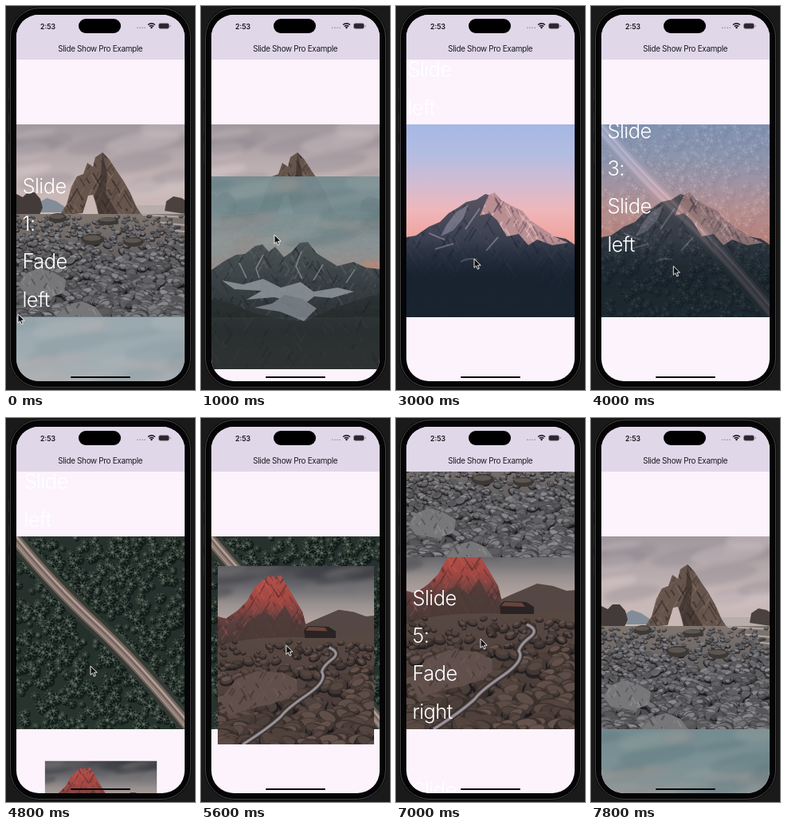
An HTML page with a canvas that plays this animation: 237 px wide and 480 px high, repeating every 8000 ms.

```html
<!DOCTYPE html>
<html lang="en">
<head>
<meta charset="utf-8">
<title>Slide show</title>
<style>
html, body { margin: 0; width: 100%; height: 100%; overflow: hidden; background: #1a1a1b; }
body { position: relative; font-family: Inter, Roboto, sans-serif; }
body *, canvas { position: absolute; box-sizing: border-box; }
.button { left: 3px; width: 4px; background: #29292b; border-radius: 2px; }
.phone { left: 5px; top: 2px; width: 227px; height: 475px; border-radius: 37px; background: #050506;
  border: 1.5px solid #454547; box-shadow: 0 0 0 1px #0b0b0c; }
.screen { left: 12.5px; top: 10.5px; width: 211.5px; height: 458.5px; border-radius: 28px; overflow: hidden; background: #fcf3fd; }
.bar { left: 0; top: 0; width: 100%; height: 56.5px; background: #e0d7e9; }
.view { left: 0; top: 56.5px; width: 100%; height: 402px; overflow: hidden; }
.time { left: 30.5px; top: 9px; font: 600 8.7px/12px Inter, sans-serif; color: #151318; white-space: pre; }
.title { left: 0; width: 100%; top: 35.5px; text-align: center; font: 400 9.9px/14px Inter, sans-serif;
  letter-spacing: -.3px; color: #1d1a20; white-space: pre; }
.island { left: 78px; top: 5.5px; width: 53px; height: 18px; border-radius: 9px; background: #000; }
.home { left: 68.5px; top: 452px; width: 75px; height: 2.6px; border-radius: 2px; background: #08080a; }
.slide { left: 0; top: 81px; width: 212px; height: 241px; }
.caption { left: 8px; top: 133.5px; font: 300 25.5px/47.4px Inter, Roboto, sans-serif; letter-spacing: -.6px;
  color: #fff; white-space: pre; }
svg { left: 0; top: 0; overflow: visible; }
</style>
</head>
<body>
<div class="button" style="top:102px;height:16px"></div>
<div class="button" style="top:133px;height:27px"></div>
<div class="button" style="top:170px;height:27px"></div>
<div class="phone"></div>
<div class="screen">
  <div class="view" id="view"></div>
  <div class="bar"></div>
  <div class="time">2:53</div>
  <div class="title">Slide Show Pro Example</div>
  <div class="island"></div>
  <svg width="212" height="40">
    <path d="M151 16.3h11" stroke="#a59daa" stroke-width="1.5" stroke-dasharray="1.6 1.5"/>
    <path d="M165 12.5q4.5-3.6 9 0M166.7 14.5q2.8-2.2 5.6 0" fill="none" stroke="#151318" stroke-width="1.5"/>
    <path d="M167.8 15.7q1.7-1.3 3.4 0l-1.7 1.8z" fill="#151318"/>
    <rect x="178.5" y="10.7" width="13" height="6.6" rx="2" fill="#29262d" stroke="#8b8591" stroke-width=".7"/>
    <path d="M193.2 13v2" stroke="#8b8591"/>
  </svg>
  <div class="home"></div>
</div>
<svg id="cursor" width="12" height="16"><path d="M0 0V11.2L2.6 8.8 4.4 13 6.3 12.1 4.6 8.1H8.2Z" fill="#111" stroke="#fff" stroke-width=".9"/></svg>
<script>
const W = 212, H = 241, LOOP = 8000, STEP = 200;
const view = document.getElementById('view');
const cursor = document.getElementById('cursor');

function random(seed) {
  return () => (seed = (seed * 16807) % 2147483647) / 2147483647;
}

function gradient(g, y0, y1, ...colors) {
  const fill = g.createLinearGradient(0, y0, 0, y1);
  colors.forEach((c, i) => fill.addColorStop(i / (colors.length - 1), c));
  return fill;
}

// Points are written as an "x,y x,y" string.
function shape(g, fill, points) {
  g.fillStyle = fill;
  g.fill(new Path2D('M' + points + 'Z'));
}

function line(g, color, width, path) {
  g.strokeStyle = color;
  g.lineWidth = width;
  g.stroke(new Path2D(path));
}

function oval(g, fill, x, y, rx, ry, turn = 0) {
  g.fillStyle = fill;
  g.beginPath();
  g.ellipse(x, y, rx, ry, turn, 0, 7);
  g.fill();
}

function sky(g, bottom, ...colors) {
  g.fillStyle = gradient(g, 0, bottom, ...colors);
  g.fillRect(0, 0, W, H);
}

function clouds(g, rnd, count, bottom, tones) {
  g.filter = 'blur(6px)';
  for (let i = 0; i < count; i++)
    oval(g, tones[i % tones.length], rnd() * W, rnd() * bottom, 20 + rnd() * 38, 4 + rnd() * 9, -.15);
  g.filter = 'none';
}

// Stones grow towards the viewer; each has a shadow and a lit top.
function stones(g, rnd, count, top, size, tone) {
  for (let i = 0; i < count; i++) {
    const depth = i / count, y = top + depth * (H - top + 4), x = rnd() * W;
    const r = size * (.25 + .75 * depth) * (.5 + rnd() * .8), turn = rnd() - .5;
    oval(g, 'rgba(25,24,27,.75)', x, y + r * .25, r * 1.12, r * .74, turn);
    oval(g, tone(rnd(), .75), x, y, r, r * .62, turn);
    oval(g, tone(rnd(), 1), x - r * .1, y - r * .18, r * .7, r * .34, turn);
  }
}

// Short slanted strokes inside a shape give it a rocky grain.
function grain(g, rnd, points, count, colors, length = 12) {
  g.save();
  g.clip(new Path2D('M' + points + 'Z'));
  for (let i = 0; i < count; i++) {
    const x = rnd() * W, y = rnd() * H, d = rnd() * length, side = rnd() < .5 ? -1 : 1;
    line(g, colors[i % colors.length], .6 + rnd() * 2, `M${x} ${y}l${d * .6 * side} ${d}`);
  }
  g.restore();
}

function beach(g) {
  const rnd = random(41);
  sky(g, 112, '#a1989d', '#b4a8ab', '#c8b8b8', '#cabab6');
  clouds(g, rnd, 16, 80, ['rgba(137,130,139,.32)', 'rgba(214,201,203,.35)']);
  shape(g, '#828d99', '28,98 38,92 50,96 62,104 62,110 28,110');
  g.fillStyle = '#b7adab';
  g.fillRect(140, 101, W, 16);
  const left = '0,87 8,91 14,85 23,85 30,93 33,104 29,113 0,112';
  const right = '186,108 188,96 197,90 207,92 212,95 212,112';
  const arch = '54,114 63,100 69,78 76,65 84,62 89,48 96,53 99,41 108,35 116,43 125,57 134,70 143,86 151,104 159,116 104,117 101,102 96,88 90,89 83,111';
  shape(g, '#423b3a', left);
  shape(g, '#4b4240', right);
  shape(g, '#66554c', arch);
  grain(g, rnd, arch, 900, ['rgba(45,37,35,.55)', 'rgba(138,116,101,.45)', 'rgba(82,66,57,.6)'], 18);
  shape(g, 'rgba(42,34,33,.5)', '108,36 114,62 112,86 129,115 104,117 97,90 105,74');
  g.fillStyle = gradient(g, 110, H, '#81766f', '#605d5f', '#45474b');
  g.fillRect(0, 112, W, H);
  line(g, '#b0a6a5', 2, 'M158 113l54 3M176 122l36 4M190 132l22 2');
  stones(g, rnd, 1050, 114, 9, (v, k) => `rgb(${(78 + v * 63) * k},${(77 + v * 63) * k},${(80 + v * 65) * k})`);
  [[96, 144, 14, 7], [147, 147, 13, 6], [52, 117, 11, 6], [115, 121, 13, 5]].forEach(([x, y, rx, ry]) => {
    oval(g, '#3c3836', x, y, rx, ry);
    oval(g, '#5e5650', x - 1, y - 2, rx * .8, ry * .5);
  });
  const slabs = ['3,201 10,187 27,180 45,184 62,194 60,210 40,217 12,213', '51,239 64,225 82,221 99,228 109,241 51,241'];
  slabs.forEach(slab => {
    shape(g, '#777779', slab);
    grain(g, rnd, slab, 700, ['rgba(54,55,58,.5)', 'rgba(151,151,153,.5)'], 10);
  });
}

function glacier(g) {
  const rnd = random(77);
  sky(g, 120, '#748b90', '#7b9195', '#8a9698', '#9c918d');
  clouds(g, rnd, 22, 90, ['rgba(91,117,123,.35)', 'rgba(154,164,163,.32)', 'rgba(158,142,139,.25)']);
  g.filter = 'blur(5px)';
  oval(g, '#b48e7e', 205, 115, 20, 10);
  g.filter = 'none';
  const ridge = '0,117 16,106 31,98 42,97 55,87 64,85 72,94 80,88 91,101 101,94 111,83 121,82 132,96 143,103 158,112 178,107 194,114 212,116 212,241 0,241';
  shape(g, gradient(g, 82, 200, '#4c5457', '#353d41', '#242b2d'), ridge);
  grain(g, rnd, ridge, 800, ['rgba(28,36,40,.5)', 'rgba(112,121,125,.3)', 'rgba(61,69,73,.5)'], 16);
  shape(g, '#858d91', '13,130 40,135 65,128 87,139 112,132 128,144 158,139 179,144 151,152 129,150 115,161 79,151 44,154 63,143 29,141');
  shape(g, '#737c81', '92,148 114,153 132,165 116,181 86,169 54,164 76,159');
  line(g, 'rgba(160,165,167,.65)', 1.5, 'M65 98l-9 17l4 12M113 94l-7 18l8 16M35 108l9 19M140 110l-12 20M180 116l-11 17');
  shape(g, gradient(g, 145, H, '#2c3233', '#1f2526', '#242728'), '0,153 25,159 54,171 91,179 118,181 149,166 182,155 212,146 212,241 0,241');
  grain(g, rnd, '0,160 55,177 118,186 212,151 212,241 0,241', 260, ['rgba(17,22,23,.35)', 'rgba(59,63,63,.25)'], 18);
}

function sunset(g) {
  const rnd = random(123);
  sky(g, 143, '#a6b8e4', '#b3bde2', '#d0bcd4', '#efb7bb', '#f0a39e');
  const peak = '0,141 12,139 28,128 42,122 53,111 65,104 75,97 88,94 99,87 106,89 110,85 119,95 132,102 145,108 155,120 170,130 185,140 200,143 212,151 212,241 0,241';
  shape(g, gradient(g, 85, H, '#5b5663', '#3e4353', '#202b39', '#172230'), peak);
  grain(g, rnd, peak, 600, ['rgba(25,34,48,.35)', 'rgba(88,86,101,.24)'], 17);
  const lit = '103,89 110,85 119,95 132,102 145,108 155,120 170,130 185,140 203,148 183,151 164,144 153,151 141,137 126,140 114,120 104,111 92,114 99,98';
  shape(g, '#b98f93', lit);
  grain(g, rnd, lit, 700, ['rgba(82,67,83,.45)', 'rgba(241,204,201,.55)'], 14);
  shape(g, 'rgba(151,150,170,.55)', '62,110 78,100 71,118 58,133 43,140 50,126');
  line(g, 'rgba(154,151,170,.6)', 2, 'M28 136l20 8M36 156l23 -7M92 105l-18 26M68 172q9-6 21-3M115 141l-15 17');
  g.fillStyle = gradient(g, 145, H, 'rgba(23,33,47,0)', 'rgba(23,33,46,.8)', '#1a2531');
  g.fillRect(0, 145, W, 96);
}

function forest(g) {
  const rnd = random(205);
  sky(g, H, '#28332f', '#25302c', '#28352e');
  for (let i = 0; i < 720; i++) {
    const x = rnd() * W, y = i / 720 * (H + 8), r = 3 + rnd() * 4, v = rnd() * 24;
    oval(g, 'rgba(15,24,22,.75)', x + 2, y + 2, r, r);
    for (let k = 0; k < 7; k++) {
      const a = k * .9 + v;
      line(g, `rgba(${60 + v},${73 + v},${64 + v},.8)`, 1.2, `M${x} ${y}l${Math.cos(a) * r} ${Math.sin(a) * r}`);
    }
    oval(g, `rgba(${88 + v},${100 + v},${89 + v},.65)`, x, y, r * .28, r * .28);
  }
  const road = 'M-4 0Q45 60 98 109T218 240';
  line(g, '#343b34', 23, road);
  line(g, '#6f625c', 14, road);
  line(g, '#948078', 9, road);
  line(g, '#bba6a0', 1.6, 'M-2 -2Q47 58 100 107T220 238');
  line(g, '#665d55', 1.5, road);
  line(g, '#ac9890', 1.2, 'M-7 3Q42 63 95 112T215 243');
}

function redPeak(g) {
  const rnd = random(319);
  sky(g, 76, '#45464b', '#65656a', '#98908f', '#b7a8a4');
  clouds(g, rnd, 14, 38, ['rgba(59,61,67,.4)', 'rgba(135,130,131,.25)']);
  shape(g, '#554743', '100,91 116,80 131,73 150,65 164,59 184,62 201,68 212,67 212,120 100,120');
  const peak = '0,68 11,71 27,60 40,47 50,29 62,18 70,13 78,15 86,13 94,27 102,40 109,52 115,62 120,81 132,100 0,112';
  shape(g, gradient(g, 12, 106, '#b2514b', '#a74843', '#5d4140', '#453a38'), peak);
  grain(g, rnd, peak, 1000, ['rgba(79,42,43,.5)', 'rgba(195,93,80,.34)', 'rgba(75,48,46,.45)'], 18);
  shape(g, 'rgba(75,59,56,.8)', '24,91 49,70 64,61 78,73 91,53 103,75 121,83 132,103 10,108');
  g.fillStyle = gradient(g, 90, H, '#594943', '#51423e', '#302927');
  g.beginPath();
  g.moveTo(0, 110);
  g.bezierCurveTo(50, 88, 130, 101, W, 94);
  g.lineTo(W, H);
  g.lineTo(0, H);
  g.fill();
  stones(g, rnd, 330, 102, 17, (v, k) => `rgba(${(73 + v * 39) * k},${(60 + v * 31) * k},${(55 + v * 29) * k},.85)`);
  shape(g, '#292323', '117,87 122,81 150,82 160,88 160,97 118,97');
  shape(g, '#6c433d', '119,87 123,82 145,83 149,88');
  shape(g, '#604f4b', '3,181 25,153 53,142 88,144 107,153 108,169 91,179 72,187 41,193 16,203');
  grain(g, rnd, '3,181 25,153 53,142 88,144 107,153 108,169 41,193 16,203', 700, ['rgba(47,38,36,.45)', 'rgba(125,105,98,.25)'], 14);
  const stream = 'M151 110Q167 117 155 126T141 143Q149 155 121 174T86 203Q69 219 34 241';
  line(g, '#383235', 8, stream);
  line(g, '#82797b', 4, stream);
  line(g, '#aaa1a3', 1.3, stream);
}

function addSlide(draw) {
  const canvas = document.createElement('canvas');
  canvas.className = 'slide';
  canvas.width = W * 2;
  canvas.height = H * 2;
  const g = canvas.getContext('2d');
  g.scale(2, 2);
  draw(g);
  view.append(canvas);
  return canvas;
}

function addCaption(text) {
  const el = document.createElement('div');
  el.className = 'caption';
  el.textContent = text;
  el.style.zIndex = 20;
  view.append(el);
  return el;
}

// Each track is a list of [time, value]; equal times make a hard change.
function at(track, t) {
  if (!track) return 0;
  const i = track.findIndex(key => key[0] > t);
  if (i < 0) return track[track.length - 1][1];
  if (!i) return track[0][1];
  const [t0, a] = track[i - 1], [t1, b] = track[i];
  return a + (b - a) * (t - t0) / (t1 - t0);
}

const shown = (start, full, hold, end) => [[0, 0], [start, 0], [full, 1], [hold, 1], [end, 0]];
const away = (start, end) => [[start, 0], [end, -240]];

const parts = [
  { el: addSlide(beach),
    y: [[0, 0], [5600, 0], [5600, -241], [6800, -241], [7000, -215], [7200, -145], [7400, -42], [7600, 0]],
    alpha: [[0, 1], [1400, 1], [1400, 0], [5800, 0], [5800, 1]] },
  { el: addSlide(glacier),
    y: [[0, 240], [500, 240], [800, 150], [1000, 65], [1200, 14], [1400, 0], [7000, 0], [7000, 240]],
    alpha: [[0, .72], [500, .75], [1000, .95], [1400, 1], [2800, 1], [2800, 0], [7400, 0], [7600, 1]] },
  { el: addSlide(sunset), alpha: [[0, 0], [2200, 0], [2800, 1], [4600, 1], [4600, 0]] },
  { el: addSlide(forest), alpha: [[0, 0], [3800, 0], [4500, 1], [5800, 1], [5800, 0]] },
  { el: addSlide(redPeak),
    y: [[0, 240], [5000, 240], [5400, 105], [5600, 28], [5800, 0]],
    scale: [[0, .664], [5000, .664], [5400, .85], [5800, 1]],
    alpha: [[0, 0], [4200, 0], [4600, 1], [7600, 1], [7600, 0]] },
  { el: addCaption('Slide\n1:\nFade\nleft'),
    x: [[400, 0], [800, -25]], alpha: [[0, 1], [400, 1], [800, 0]] },
  { el: addCaption('Slide\n2:\nSlide\nleft'),
    x: [[0, -70], [1400, -70], [1800, 0], [2600, 0], [3200, -9]],
    y: away(2200, 2800), alpha: shown(1400, 1800, 3000, 3400) },
  { el: addCaption('Slide\n3:\nSlide\nleft'),
    x: [[0, -70], [3000, -70], [3400, 0], [4200, 0], [4800, 2]],
    y: away(3800, 4500), alpha: shown(3000, 3400, 4800, 5200) },
  { el: addCaption('Slide\n5:\nFade\nright'),
    x: [[6000, 22], [6500, 0]], alpha: shown(6000, 6600, 7000, 7400) },
  { el: addCaption('Slide'), y: [[0, 240]], alpha: shown(5700, 6000, 7000, 7300) }
];

const pointer = [
  [0, 15, 385], [400, 70, 360], [600, 90, 360], [1000, 92, 286], [1300, 94, 255],
  [2000, 97, 350], [2600, 98, 292], [3000, 98, 316], [3700, 102, 355], [4400, 105, 285],
  [4800, 106, 310], [5100, 106, 345], [5700, 107, 272], [6000, 107, 285], [6700, 105, 250],
  [7000, 106, 276], [7400, 112, 335], [7800, 114, 335]
];
const pointerX = pointer.map(([t, x]) => [t, x]);
const pointerY = pointer.map(([t, , y]) => [t, y]);

function render(now) {
  const t = Math.floor(now % LOOP / STEP) * STEP;
  for (const { el, x, y, scale, alpha } of parts) {
    el.style.transform = `translate(${at(x, t)}px, ${at(y, t)}px) scale(${scale ? at(scale, t) : 1})`;
    el.style.opacity = at(alpha, t);
  }
  parts[0].el.style.zIndex = t >= 5600 ? 9 : 0;
  cursor.style.transform = `translate(${at(pointerX, t)}px, ${at(pointerY, t)}px)`;
}

const start = performance.now();
function frame() {
  render(performance.now() - start);
  requestAnimationFrame(frame);
}
frame();
</script>
</body>
</html>
```
